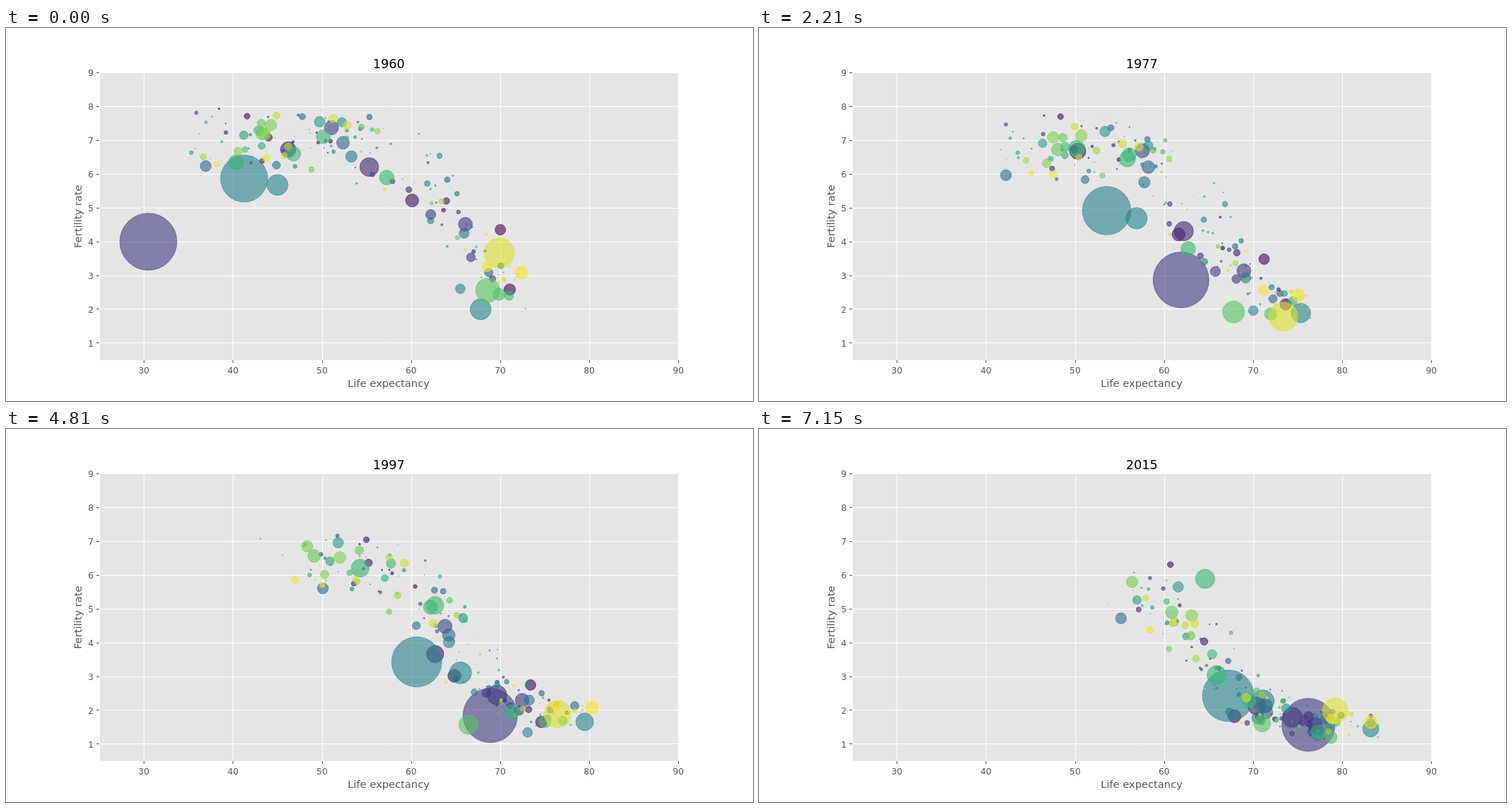
These frames come from a looping animation (1058x529 px, 7.28 s). An HTML page with a canvas:

```html
<!DOCTYPE html>
<html lang="en">
<head>
<meta charset="utf-8">
<title>Fertility rate by life expectancy</title>
<style>
  html, body { margin: 0; width: 100%; height: 100%; overflow: hidden; background: #fff; }
  canvas { display: block; }
</style>
</head>
<body>
<canvas id="chart" width="1058" height="529"></canvas>
<script>
const ctx = document.getElementById('chart').getContext('2d');
const FIRST = 1960, YEARS = 56, STEP = 130;
const LEFT = 132.25, TOP = 63.5, WIDTH = 820, HEIGHT = 407.3;

const lerp = (a, b, t) => a + (b - a) * t;
const progress = year => (year - FIRST) / (YEARS - 1);
const xOf = life => LEFT + (life - 25) / 65 * WIDTH;
const yOf = rate => TOP + HEIGHT - (rate - 0.5) / 8.5 * HEIGHT;

const VIRIDIS = [[68, 1, 84], [68, 57, 131], [49, 104, 142], [33, 145, 140],
  [53, 183, 121], [143, 215, 68], [253, 231, 37]];
function viridis(v) {
  const i = Math.min(5, Math.floor(v * 6));
  return `rgba(${VIRIDIS[i].map((a, k) => Math.round(lerp(a, VIRIDIS[i + 1][k], v * 6 - i)))},0.6)`;
}

// Every bubble has a rank (colour and stacking) and a function year -> [life, rate, radius].
const bubbles = [];
const add = (rank, at) => bubbles.push({ rank, color: viridis(rank), at });

// A leading country passes through a few points [year, life, rate].
function leader(rank, r0, r1, ...points) {
  add(rank, year => {
    const i = Math.max(1, points.findIndex(p => p[0] >= year));
    const [a, b] = [points[i - 1], points[i]];
    const t = (year - a[0]) / (b[0] - a[0]);
    return [lerp(a[1], b[1], t), lerp(a[2], b[2], t), lerp(r0, r1, progress(year))];
  });
}
leader(.18, 40.8, 38, [1960, 30.5, 4], [1965, 54.5, 6.4], [1971, 62, 5.4], [1977, 61.9, 2.87],
  [1986, 66, 2.68], [2002, 70.2, 1.47], [2015, 76.2, 1.57]);
leader(.44, 33.7, 36.9, [1960, 41.25, 5.87], [1977, 53.55, 4.92], [1992, 58.8, 3.71], [2015, 67.2, 2.43]);
leader(.95, 21.8, 18.5, [1960, 69.9, 3.67], [1977, 73.4, 1.78], [2015, 79.2, 1.98]);
leader(.45, 15.2, 16.3, [1960, 45, 5.68], [1971, 53.4, 5.41], [1986, 62.15, 3.62], [2015, 71.1, 2.27]);
leader(.12, 13.7, 14.7, [1960, 55.3, 6.21], [1992, 68.3, 2.64], [2015, 74.4, 1.79]);
leader(.07, 11.3, 13.2, [1960, 46.2, 6.73], [1977, 50.3, 6.68], [2002, 65.8, 2.91], [2015, 70.4, 2.13]);
leader(.67, 10.7, 14, [1960, 46.8, 6.6], [1986, 60.7, 6.37], [2015, 65.9, 3.04]);
leader(.66, 11, 14, [1960, 40.35, 6.35], [1977, 50.2, 6.76], [2002, 55.3, 6.07], [2015, 64.6, 5.89]);
leader(.73, 17.5, 12.3, [1960, 68.6, 2.56], [1977, 67.8, 1.92], [1986, 69.8, 2.19], [2002, 64.9, 1.29], [2015, 71, 1.61]);
leader(.46, 15.2, 11.8, [1960, 67.8, 2], [1977, 75.35, 1.89], [2015, 83.2, 1.45]);

// All others: life expectancy rises and the birth rate falls along an S-curve.
let seed = 1960;
function random() {
  seed = (seed * 16807) % 2147483647;
  return seed / 2147483647;
}
const spread = amount => (random() + random() - 1) * amount;

function follower() {
  const poor = random() < 0.6;
  const start = poor ? 35 + 27 * random() : 61 + 12 * random();
  const end = Math.min(83.5, 60 + (start - 40) * 0.64 + spread(7));
  const dip = end < 67 && random() < 0.4 ? 4 + 7 * random() : 0;
  const turn = 65 + spread(5), offset = spread(1.3), phase = random() * 6.3;
  const radius = 0.8 + 10 * random() ** 2.7;
  add(random(), year => {
    const t = progress(year);
    const life = lerp(start, end, t) + 0.6 * Math.sin(t * 7 + phase)
      - dip * Math.exp(-(((year - 2002) / 8) ** 2));
    const high = 1 / (1 + Math.exp((life - turn) / 3));
    const rate = lerp(2.3, 1.55, t) + (4.6 - 0.5 * t ** 4) * high
      + offset * (0.4 + 0.6 * high) + 0.12 * Math.sin(t * 9 + phase);
    return [life, rate, radius];
  });
}
for (let i = 0; i < 170; i++) follower();
bubbles.sort((a, b) => a.rank - b.rank);

function text(str, x, y, size, align = 'center', color = '#555') {
  ctx.font = `${size}px "DejaVu Sans", sans-serif`;
  ctx.textAlign = align;
  ctx.fillStyle = color;
  ctx.fillText(str, x, y);
}

function line(x1, y1, x2, y2, color) {
  ctx.strokeStyle = color;
  ctx.beginPath();
  ctx.moveTo(x1, y1);
  ctx.lineTo(x2, y2);
  ctx.stroke();
}

function drawAxes(year) {
  ctx.fillStyle = '#fff';
  ctx.fillRect(0, 0, 1058, 529);
  ctx.fillStyle = '#e5e5e5';
  ctx.fillRect(133, 64, 819, 407);
  ctx.lineWidth = 1;
  for (let life = 30; life <= 90; life += 10) {
    const x = Math.round(xOf(life)) + 0.5;
    line(x, 64, x, 471, '#fff');
    line(x, 471, x, 475, '#555');
    text(life, xOf(life), 489.5, 12.24);
  }
  for (let rate = 1; rate <= 9; rate++) {
    const y = Math.floor(yOf(rate)) + 0.5;
    line(133, y, 952, y, '#fff');
    line(128, y, 132, y, '#555');
    text(rate, 124, yOf(rate) + 4.8, 12.24, 'right');
  }
  text(year, 542.2, 56.5, 17.63, 'center', '#000');
  text('Life expectancy', 542, 508.8, 14.69);
  ctx.save();
  ctx.translate(107, 267.2);
  ctx.rotate(-Math.PI / 2);
  text('Fertility rate', 0, 0, 14.69);
  ctx.restore();
}

function draw(year) {
  drawAxes(year);
  ctx.save();
  ctx.beginPath();
  ctx.rect(132, 63.5, 820, 407.5);
  ctx.clip();
  for (const { color, at } of bubbles) {
    const [life, rate, r] = at(year);
    ctx.fillStyle = ctx.strokeStyle = color;
    ctx.beginPath();
    ctx.arc(xOf(life), yOf(rate), Math.max(0.4, r - 0.4), 0, 2 * Math.PI);
    ctx.fill();
    ctx.stroke();
  }
  ctx.restore();
}

function tick() {
  draw(FIRST + Math.floor(performance.now() / STEP) % YEARS);
  requestAnimationFrame(tick);
}
tick();
</script>
</body>
</html>
```
